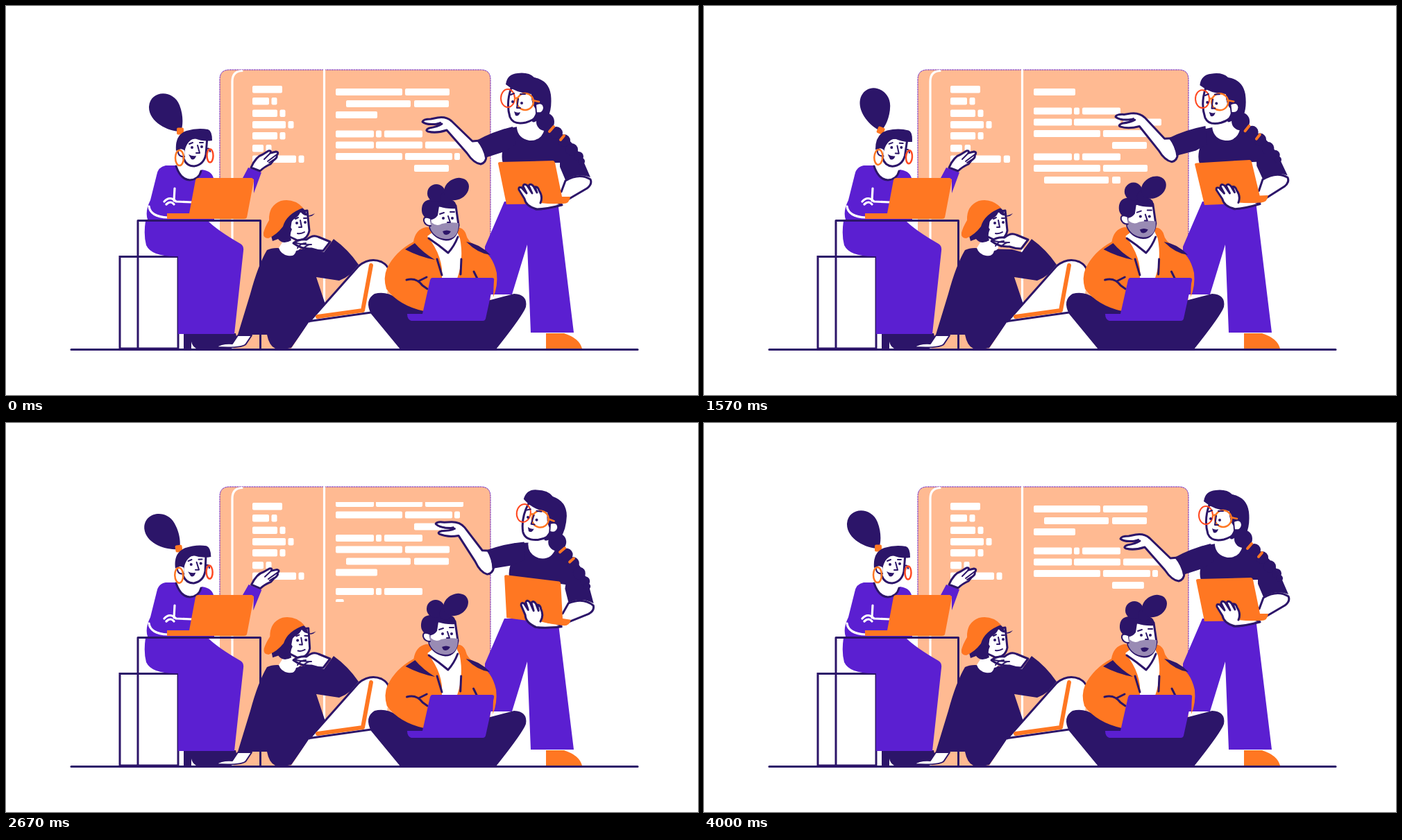
Recreate the animation shown at these times as an HTML page. Size 997x561 px, loop 4.03 s.

```html
<!DOCTYPE html>
<html lang="en">
<head>
<meta charset="utf-8">
<title>Team at work</title>
<style>
html, body { margin: 0; width: 100%; height: 100%; overflow: hidden; background: #fff; }
svg { display: block; }
.d { fill: #2c1569; }
.p { fill: #5b1fd1; }
.o { fill: #ff7722; }
.w { fill: #fff; }
.k { fill: #fff; stroke: #2c1569; stroke-width: 3; }
.l { fill: none; stroke: #2c1569; stroke-width: 3; }
.t { stroke-width: 2; }
.wl { fill: none; stroke: #fff; stroke-width: 3.2; }
.ol { fill: none; stroke: #ff7722; stroke-width: 2.5; }
path { stroke-linecap: round; stroke-linejoin: round; }
</style>
</head>
<body>
<svg width="997" height="561" viewBox="0 0 997 561">
<defs><clipPath id="pane"><rect x="460" y="114" width="230" height="144"/></clipPath></defs>

<!-- board -->
<path fill="#ffba92" d="M308 495V106Q308 92 322 92H684Q698 92 698 106V495Z"/>
<path fill="none" stroke="#6a24c4" stroke-dasharray="2 1.5" d="M308 300V106Q308 92 322 92H684Q698 92 698 106V345"/>
<path class="wl" d="M458.500 92V495M340 93.500Q326 94 326 109V495"/>
<g id="menu" class="w"></g>
<g clip-path="url(#pane)"><g id="code" class="w"></g></g>

<!-- standing woman -->
<path class="p" d="M718 282L690 347L690 416H729L751 344L756 471H818L795 282Z"/>
<path class="o" d="M778 472H804Q826 479 830 494H778Z"/>
<g id="lean">
  <path class="d" d="M716 178L737 174Q755 198 776 176L800 184Q822 200 832 224L842 247Q824 240 806 251L798 232V226L716 227Q712 214 719 198Z"/>
  <path class="w" d="M736 160H776V177Q772 195 754 194Q738 191 736 176Z"/>
  <g class="d">
    <circle cx="777" cy="167" r="13"/><circle cx="793" cy="183" r="9"/><circle cx="804" cy="194" r="9"/>
    <circle cx="815" cy="207" r="9"/><circle cx="825" cy="217" r="7"/><circle cx="829" cy="224" r="5"/>
  </g>
  <path class="ol" style="stroke-width:4" d="M783 181L789 174M799 193L804 187"/>
  <path class="k" d="M728 118Q720 140 726 160Q731 172 749 168Q764 164 770 152V125Z"/>
  <path class="d" d="M720 113Q722 98 737 97Q753 95 761 103Q782 107 785 128Q787 147 781 160L764 166Q757 170 758 164Q764 156 764 150Q756 140 757 127Q735 126 720 113Z"/>
  <path class="k t" d="M763 142Q774 137 775 147Q774 156 764 154Z"/>
  <ellipse class="ol" style="stroke:#ff4a22;stroke-width:2" cx="723" cy="133" rx="10" ry="13"/>
  <circle class="ol" cx="748" cy="138" r="12"/>
  <path class="ol" d="M733 134Q736 131 738 134M759 136L768 138"/>
  <path class="l t" d="M738 134L736 147H741M727 128L732 126M741 127L748 127"/>
  <path class="d" d="M732 152Q737 155 741 153Q739 160 734 158Z"/>
  <circle class="d" cx="730" cy="138" r="2"/><circle class="d" cx="743" cy="140" r="2"/>
  <path class="k" d="M806 252Q826 240 842 250Q845 257 837 263L796 287Q778 293 763 293Q752 288 752 280L800 268Z"/>
  <path class="o" d="M709 227Q709 225 712 225L788 223Q790 223 791 226L801 275H813Q812 285 803 285L721 286Z"/>
  <path class="k" d="M801 287Q778 293 765 293Q749 289 747 278L739 265Q738 260 743 262L750 270L745 260Q746 255 751 259L758 270L753 259Q756 255 760 260L765 269L762 261Q766 260 768 266Q774 275 770 284"/>
  <g id="arm">
    <path class="k" d="M672 195L642 166Q634 159 622 161L612 163Q601 163 600 167Q606 172 622 170L628 170Q622 174 610 176Q603 179 608 181Q620 184 635 179L664 212Q674 227 684 228Q692 226 692 216L683 194Z"/>
    <path class="l t" d="M606 170Q618 172 626 168"/>
    <path class="d" d="M730 174Q701 181 678 194Q688 206 690 219L718 210L734 200Z"/>
  </g>
</g>

<!-- seated woman -->
<rect class="k" x="164" y="361.500" width="84" height="132.500"/>
<path class="d" d="M256 472H331Q336 490 324 494H274Q268 490 267 484V494H256Z"/>
<path class="p" d="M201 310H291Q305 324 338 343Q343 346 342 353L329 473H248V361Q210 362 202 345Q198 330 201 310Z"/>
<g id="wave">
  <path class="p" d="M340 250L349 233L368 240L357 270V250Z"/>
  <path class="k" d="M353 233Q360 217 370 214L378 209Q383 208 381 212L389 210Q394 211 390 215Q392 218 385 223L381 228Q372 232 366 238Z"/>
  <path class="l t" d="M381 212L372 221M389 215L377 224M385 222L379 226"/>
</g>
<path class="p" d="M230 230H250L282 236Q300 238 300 255V308H204Q200 296 208 280L217 244Q219 232 230 230Z"/>
<path class="w" d="M247 225L282 228V238Q276 251 264 250Q250 246 246 231Z"/>
<path class="l" d="M245 231Q252 251 265 251Q278 250 281 238"/>
<path class="wl" d="M206 289Q208 304 233 305M243 263L242 281M228 282Q236 273 245 282L268 283M231 286Q237 280 242 286"/>
<path class="o" d="M277 248H354Q357 249 357 252L347 305Q346 307 343 307H232V299H264L273 251Q274 248 277 248Z"/>
<g id="head">
  <g id="pony">
    <path class="d" d="M252 181C236 182 205 168 206 145C208 121 241 120 250 143C256 158 255 173 252 181Z"/>
    <rect class="o" x="246" y="175.500" width="10" height="10" rx="2"/>
  </g>
  <path class="k" d="M255 192L256 220Q260 231 271 231Q285 229 288 214L290 188Z"/>
  <path class="d" d="M245 209Q243 186 260 180Q276 175 291 178Q297 180 297 194Q284 196 272 191Q260 194 257 211Q250 205 245 209Z"/>
  <path class="k t" d="M257 207Q248 202 248 211Q249 218 257 217M289 206Q294 204 294 210"/>
  <ellipse class="ol" cx="250" cy="219" rx="6" ry="11"/>
  <ellipse class="ol" style="stroke:#ff4a22" cx="294" cy="216" rx="4.500" ry="9.500"/>
  <path class="l t" d="M276 201L279 212H274M264 199L269 197M279 197L284 197"/>
  <path class="d" d="M263 214Q268 217 274 216Q272 223 267 221Z"/>
  <circle class="d" cx="268" cy="204" r="2"/><circle class="d" cx="282" cy="203" r="2"/>
</g>

<!-- man with cap -->
<path class="d" d="M376 352Q386 347 400 350L444 351L458 355L472 336Q493 351 508 373Q500 388 480 396L447 391L460 430L437 456L411 493Q400 496 388 494Q379 490 376 474H334L352 415Q363 374 376 352Z"/>
<path class="k t" d="M334 475H354L346 487Q342 494 303 492Q310 486 326 487Z"/>
<path class="l" d="M190 494V309.500H366.500V494"/>
<path class="w" d="M393 349L405 330L424 345Q425 352 418 353Q416 362 406 360Q396 358 393 349Z"/>
<g id="cap">
  <path class="k" d="M412 298L434 295L437 324Q434 338 420 338L407 332Z"/>
  <path class="d" d="M383 312Q380 328 384 339L392 336Q399 345 411 338Q408 330 412 322Q406 316 414 308Q424 302 424 296Q430 307 445 299Q440 305 434 303Q432 293 425 290L402 294Z"/>
  <path class="o" d="M379 309Q378 288 396 281Q415 277 428 291Q404 300 399 318Q390 330 378 335Q370 335 371 327Q373 319 379 309Z"/>
  <path class="l t" d="M424 309L426 319H422M417 307L421 305M429 306L433 306M420 328Q425 329 430 326"/>
  <circle class="d" cx="419" cy="313" r="2"/><circle class="d" cx="431" cy="312" r="2"/>
</g>
<g id="chin">
  <path class="k" d="M414 342Q422 336 433 337Q442 329 450 333L467 340L457 353Q448 353 440 350Q426 351 414 342Z"/>
  <path class="l t" d="M420 349Q424 342 432 342M428 350Q434 344 439 344M415 341Q424 344 440 344"/>
</g>

<!-- open book -->
<path class="w" d="M411 494L437 455L508 373Q524 362 541 369Q553 376 553 390L545 440L572 494Z"/>
<path class="l" d="M437 455L508 375Q524 362 541 369Q550 374 551 380M434 455L526 442"/>
<path class="ol" style="stroke-width:6" d="M449 448L514 439L526 374"/>

<!-- man with laptop -->
<path class="d" d="M568 495L526 444Q516 424 531 415Q548 411 562 421L604 438L694 425L732 415Q752 416 749 434Q745 446 706 495Z"/>
<g id="coat">
  <path class="o" d="M605 319Q590 322 587 340Q561 354 549 378Q543 392 548 408Q566 432 602 440L612 393H703L702 420Q709 404 707 385Q701 357 679 347Q665 341 662 327Q656 317 648 321Z"/>
  <path class="w" d="M607 332L620 322H648L654 335Q660 365 650 393H628Q631 362 607 332Z"/>
  <path class="l" d="M609 335Q624 345 637 356Q646 346 651 333M621 365L628 388M656 365L655 387M577 395Q591 391 600 403L607 408M594 397L606 391M674 383L679 393"/>
  <path class="d" d="M575 351L589 342Q600 355 618 366Q596 362 575 351ZM663 340Q683 343 698 359Q680 357 663 340Z"/>
</g>
<g id="beard">
  <path class="k" d="M611 288H648L652 316Q649 337 634 337Q617 335 611 320Z"/>
  <path fill="#998bb4" d="M612 311Q620 319 628 314Q640 311 652 313Q653 336 634 336Q617 335 611 320Z"/>
  <path class="d" d="M599 292Q600 280 612 279H640Q650 281 649 292Q635 293 624 289L622 302Q617 309 610 308Q598 304 599 292Z"/>
  <circle class="d" cx="620" cy="270" r="13"/><circle class="d" cx="634" cy="277" r="9"/>
  <ellipse class="d" cx="649" cy="264" rx="19" ry="15" transform="rotate(-32 649 264)"/>
  <path class="k t" d="M611 306Q601 302 602 310Q604 317 612 317"/>
  <path class="l t" d="M637 303L640 312H636M625 300L631 298M640 297L646 297"/>
  <path class="d" d="M629 325Q635 322 641 325Q637 332 631 329Z"/>
  <circle class="d" cx="630" cy="306" r="2"/><circle class="d" cx="643" cy="306" r="2"/>
</g>
<path class="p" d="M614 392H700Q704 392 703 396L691 451Q690 454 687 454H584Q578 452 578 444H600L611 395Q612 392 614 392Z"/>
<path class="l" d="M94 495.500H910"/>
</svg>
<script>
const LOOP = 4030, PERIOD = 143;
const $ = id => document.getElementById(id);

function addBar(parent, x, y, w, h = 10) {
  const r = document.createElementNS("http://www.w3.org/2000/svg", "rect");
  const set = { x, y, width: w, height: h, rx: 2 };
  for (const k in set) r.setAttribute(k, set[k]);
  parent.append(r);
  return r;
}

// Menu rows: top, then width of the long and the short bar
const menu = [[115, 43, 0], [132, 24, 8], [149.5, 36, 8], [166, 48, 8], [182, 36, 8], [200, 16, 8], [215.5, 63, 8]]
  .map(([y, a, b]) => {
    const g = document.createElementNS("http://www.w3.org/2000/svg", "g");
    addBar(g, 355, y, a, 10.5);
    if (b) addBar(g, 355 + a + 3.5, y, b, 10.5);
    $("menu").append(g);
    return g;
  });

// Code lines as x, width pairs
const LINES = {
  A: [475, 96, 575, 64], B: [490, 93, 588, 50], C: [475, 60],
  D: [475, 55, 533, 8, 545, 55], E: [475, 55, 533, 67, 604, 55],
  F: [475, 96, 575, 68, 646, 8], G: [588, 50]
};
const TOPS = { A: 119, B: 136, C: 152, D: 179.5, E: 195.5, F: 212, G: 229 };
const typed = [];
function addLine(name, y, start) {
  const v = LINES[name];
  for (let i = 0; i < v.length; i += 2) {
    const el = addBar($("code"), v[i], y, v[i + 1]);
    if (start !== undefined) typed.push({ el, w: v[i + 1], at: start + i * 75 });
  }
}
for (const n in TOPS) addLine(n, TOPS[n], n === "G" ? 3845 - LOOP : undefined);
addLine("D", 245.5, 60);
const STARTS = { A: 740, B: 1380, C: 1865, D: 2120, E: 2635, F: 3315, G: 3845 };
for (const n in STARTS) addLine(n, TOPS[n] + PERIOD, STARTS[n]);

// Flat lists of time, value; eased between neighbours
const SCROLL = [0, 0, 560, 0, 760, 16.5, 1150, 16.5, 1380, 33, 1710, 33, 1880, 49.5, 2035, 49.5, 2180, 76.5,
  2560, 76.5, 2780, 92.5, 3140, 92.5, 3330, 109, 3640, 109, 3980, 143, LOOP, 143];
const HEAD = [0, 0, 800, 3, 1450, 3.8, 1600, 3.6, 2450, -2.5, 3200, 0, LOOP, 0];
const PONY = [0, 0, 900, 18, 1500, 19.5, 2450, -8, 3200, 0, LOOP, 0];
const LEAN = [0, 0, 1150, 0, 2000, -3.8, 2080, -3.8, 2640, 8.5, 2800, 8.5, 3420, 0, LOOP, 0];
const ARM = [0, 0, 800, -1.6, 1080, -1.6, 1570, 4.6, 2030, -1.5, 2670, 0, 3300, 5, 3550, 5, 3980, 0, LOOP, 0];
const RISE = [0, 0, 800, -1.3, 1500, -2.5, 2030, 0, 2550, -2, 3500, -2, 3980, 0, LOOP, 0];
const CAP = [0, 0, 2050, 0, 2600, 2, 3500, 2, 3950, 0, LOOP, 0];
const WAVE = [0, 0, 1600, 0, 2030, 2, 2670, 2, 3350, 0, LOOP, 0];
const CHIN = [0, 0, 1100, 0, 1570, -3, 2000, 0, LOOP, 0];

function at(keys, t) {
  let i = 2;
  while (i < keys.length - 2 && t > keys[i]) i += 2;
  const u = (t - keys[i - 2]) / (keys[i] - keys[i - 2]);
  const e = (1 - Math.cos(Math.PI * u)) / 2;
  return keys[i - 1] + (keys[i + 1] - keys[i - 1]) * e;
}
const put = (id, value) => $(id).setAttribute("transform", value);
const turn = (id, keys, t, x, y) => put(id, `rotate(${at(keys, t)} ${x} ${y})`);
const clamp = v => Math.min(1, Math.max(0, v));

function draw(t) {
  put("code", `translate(0 ${-at(SCROLL, t)})`);
  for (const b of typed) b.el.setAttribute("width", b.w * clamp((t - b.at) / 170));

  menu.forEach((g, i) => {
    const u = clamp((t - 380 - i * 100) / 820);
    const s = 1 + 0.26 * Math.sin(Math.PI * u) ** 2;
    g.setAttribute("transform", `translate(${355 * (1 - s)} 0) scale(${s} 1)`);
  });

  turn("head", HEAD, t, 268, 240);
  turn("pony", PONY, t, 251, 180);
  turn("lean", LEAN, t, 755, 285);
  turn("arm", ARM, t, 753, 125);
  turn("cap", CAP, t, 405, 345);
  turn("wave", WAVE, t, 350, 250);

  const rise = at(RISE, t), s = 1 + rise * 0.005;
  put("beard", `translate(${rise * 0.5} ${rise})`);
  put("coat", `translate(${627 * (1 - s)} 0) scale(${s} 1)`);
  put("chin", `translate(0 ${at(CHIN, t)})`);
}

const begin = performance.now();
function tick() {
  draw((performance.now() - begin) % LOOP);
  requestAnimationFrame(tick);
}
draw(0);
requestAnimationFrame(tick);
</script>
</body>
</html>
```
